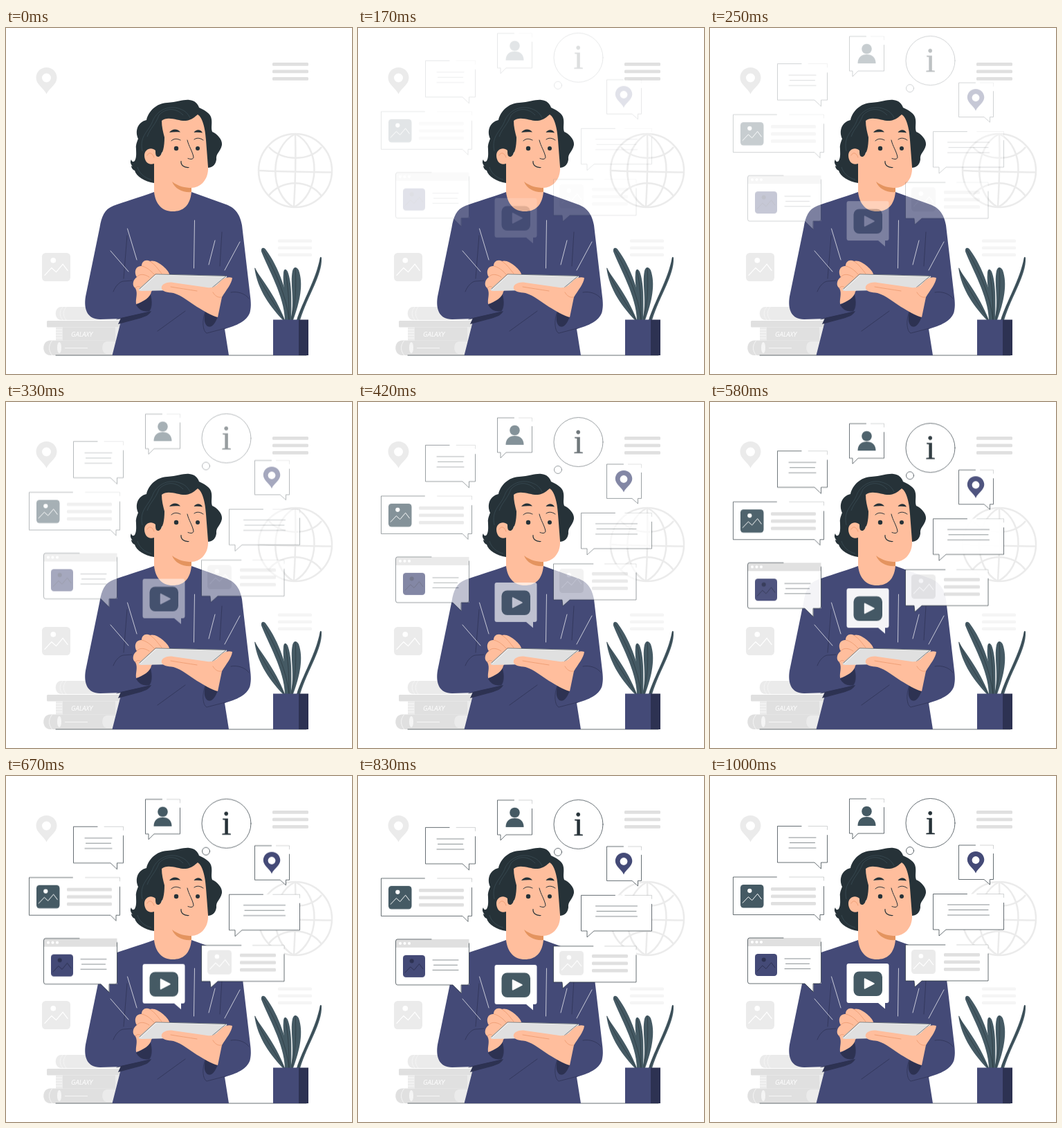
Write an HTML page that moves like this. It is 500 px wide and 500 px high and loops after 1.04 s.

```html
<!DOCTYPE html>
<html lang="en">
<head>
<meta charset="utf-8">
<title>Reading on a tablet</title>
<style>
  html, body { margin: 0; width: 100%; height: 100%; overflow: hidden; background: #fff; }
  svg { display: block; width: 100vw; height: 100vh; }
  .line { fill: none; stroke: #263238; stroke-width: .7; stroke-linecap: round; stroke-linejoin: round; }
  .thin { stroke-width: .55; }
  .globe { fill: none; stroke: #ebebeb; stroke-width: 2.5; }
  .ink { fill: #263238; }
  .slate { fill: #455a64; }
  .navy { fill: #444a77; }
  .deep { fill: #2d3252; }
  .skin { fill: #ffbe9d; }
  .shine { fill: none; stroke: #fff; stroke-width: .7; stroke-linecap: round; }
  .fold { fill: none; stroke: #2d3252; stroke-width: .7; stroke-linecap: round; }
  .crease { fill: none; stroke: #eb996e; stroke-width: .8; stroke-linecap: round; }
  .vein { fill: none; stroke: #263238; stroke-width: .6; }
  .pale { fill: #ebebeb; }
  .grey { fill: #e0e0e0; }
</style>
</head>
<body>
<svg viewBox="0 0 500 500">
  <g id="back">
    <path class="pale" fill-rule="evenodd" d="M58.500 57C50 57 43.500 63.500 43.500 72C43.500 82 55 87 58.500 95.500C62 87 73.500 82 73.500 72C73.500 63.500 67 57 58.500 57ZM58.500 65.500a6.500 6.500 0 1 1 0 13a6.500 6.500 0 1 1 0-13Z"/>
    <g class="globe">
      <ellipse cx="418" cy="206" rx="53" ry="53"/>
      <path d="M418 153C419 185 418 225 416 259M365 206C400 208 440 208 471 208.500"/>
      <path d="M418 153C380 172 380 240 416 259M418 153C456 172 454 240 416 259"/>
      <path d="M380 172C398 193 440 193 456 172M379 243C398 218 438 218 456 243"/>
    </g>
  </g>

  <g id="books">
    <path class="pale" d="M80 403H165V422H80C69 422 69 403 80 403Z"/>
    <path d="M82 403C77 409 77 416 82 422M87 403C82 409 82 416 87 422" fill="none" stroke="#f5f5f5"/>
    <rect class="grey" x="59" y="423" width="110" height="9.500" rx="1.500"/>
    <rect class="pale" x="72" y="432.500" width="95" height="19"/>
    <path d="M72 436h9M72 440h9M72 444h9M72 448h9" fill="none" stroke="#fafafa" stroke-width="1.200"/>
    <rect class="grey" x="82" y="432.500" width="76" height="19"/>
    <text x="94" y="446" font-family="Open Sans, Inter, sans-serif" font-size="9.500" font-style="italic" fill="#fff">GALAXY</text>
    <path class="grey" d="M64 451.500H160V473H64C51 473 51 451.500 64 451.500Z"/>
    <path d="M67 451.500C61 458 61 467 67 473M85 462.500h33" fill="none" stroke="#f5f5f5"/>
    <ellipse cx="77" cy="462" rx="3" ry="8" fill="#f5f5f5"/>
    <path class="pale" d="M146 453H160V471H146C137 471 137 453 146 453Z"/>
  </g>

  <path class="line" d="M72 473H434"/>

  <g id="plant">
    <g class="slate">
      <path d="M400 422C384 405 363 379 359 346C368 362 388 384 403 422Z"/>
      <path d="M403 422C402 387 379 349 369 323C368 317 373 316 376 321C394 345 408 385 412 422Z"/>
      <path d="M406 422C406 395 399 372 401 353C402 347 405 348 407 352C413 367 413 395 412 422Z"/>
      <path d="M411 422C418 395 410 370 414 351C416 344 420 345 423 350C430 370 425 395 415 422Z"/>
      <path d="M420 422C428 396 448 363 453.500 333C454 330 456 330 456 333C457 357 437 385 425 422Z"/>
    </g>
    <path class="vein" d="M360 347C370 375 388 398 402 422M371 320C388 350 405 385 409 422M403 350C408 370 409 395 409 422M418 347C420 375 418 398 413 422M455 332C452 362 431 392 422 422"/>
    <rect class="navy" x="386" y="421.500" width="38" height="51.500"/>
    <rect class="deep" x="423" y="421.500" width="14" height="51.500"/>
  </g>

  <g id="person">
    <path class="navy" d="M214 237C192 245 171 251 155 257C142 262 138 273 135.500 288L115 388C112 407 118 421 136 421L167 420L153.500 473H322L316 435C333 430 348 424 352.500 411C355 401 353.500 393 352.500 384L341 285C338 267 329 259 318 255L268 237Z"/>
    <path class="ink" d="M214 224C200 222 188 214 186 206C183 205 181 202 181 199L183 200C180 197 179 193 181 190C182 194 184 194 186 192C189 187 188 180 188 175C187 170 189 165 191 160C186 149 190 136 203 133C206 120 217 109 233 108C248 107 257 103 265 104C273 105 277 109 279 115C287 119 296 123 297 132C298 139 296 144 298 150C305 153 313 161 312 169C310 179 303 181 304 190C303 198 298 202 291 202L275 150L225 180Z"/>
    <path class="skin" d="M225 134C234 126 250 135 260 134C269 133 273 128 277 125C284 129 288 145 289 162L292 201C293 220 280 231 268 231L268 237C266 257 256 265 241 265C226 265 216 255 214 237V196C206 199 200 193 200 184C200 175 210 171 216 177C216 185 217 186 221 186C227 182 229 171 229 158C227 150 225 143 225 134Z"/>
    <path d="M240 222C249 229 259 231 268 231V237C256 238 244 233 240 222Z" fill="#e4945f"/>
    <path d="M197 178C192 155 207 150 213 132C220 118 237 110 254 118C261 121 264 126 266 130M204 157C208 145 216 140 221 126C232 114 247 116 256 126M190 201C192 209 200 217 210 219" fill="none" stroke="#455a64" stroke-width=".5"/>
    <path class="crease" d="M204 184C207 178 212 181 214 187"/>
    <path class="ink" d="M236 151C240 145 248 145 252 150.500C247 150 241 150 236 151ZM271.500 151C275 146 281 146 284 151.500C280 150.500 276 150.500 271.500 151Z"/>
    <circle class="ink" cx="246" cy="174" r="3.200"/>
    <circle class="ink" cx="277" cy="174" r="3"/>
    <g class="line">
      <path stroke-width="1" d="M239 163C243 159 248 160 252 162M272 161C276 158 281 159 285 162M262 162C264 171 270 179 271 187C270 190 267 190 263 188.500"/>
      <path stroke-width="1.200" d="M253 192.500C252.500 198 257 202 264 201.500"/>
    </g>

    <path class="deep" d="M188 400C198 396 206 387 208 382C210 390 212 403 207 409C198 411 192 407 188 400ZM166 419L210 409C207 415 202 417 192 420L162 428ZM288 410L306 417C302 428 297 434 291 431C286 427 286 419 288 410Z"/>
    <path class="fold" d="M208 384C212 395 211 407 205 411L160 421M288 410C283 422 284 438 290 441L317 434M175 300L170 362M155 381C158 373 164 367 169 366L182 365M219 438L259 409M312 295L309 344M325 382C335 380 346 384 351 391"/>
    <path class="shine" d="M151 322L177 352M175.500 290L189 335M272.500 278L271.500 347M302 307L293 342M338 309L316 350"/>

    <path class="skin" d="M188 399C187 390 191 384 187 376C181 372 184 363 189 360C184 352 188 343 196 344C196 337 202 334 208 337C217 333 236 350 236 356L222 365L210 381C209 389 198 396 188 399Z"/>
    <path class="crease" d="M189 360C192 355 200 355 207 360M196 344C202 345 209 350 214 356M208 337C215 341 220 349 225 355M187 376C190 372 193 373 195 376"/>
    <path class="grey" d="M192 377L215 357Q216 355.500 219 355.500L317 358Q321 358.500 318 361L301 376Q299 378 295 378L195 380Q191 380 192 377Z"/>
    <path d="M194 378L217 356.800L318 359.300" fill="none" stroke="#f5f5f5" stroke-width=".9"/>
    <path class="line thin" d="M193 377L216 355.800L318 358.500L297 376"/>
    <path class="skin" d="M225 377C223 371 232 366 242 368L291 375C299 376 304 373 309 367C314 361 321 359 327 361C326 370 318 379 312 389L306 418C297 416 285 408 276 403C265 396 255 387 242 383C233 382 227 381 225 377Z"/>
    <path class="crease" d="M238 374C250 376 263 378 276 380M311 389C306 390 302 387 299 382"/>
  </g>

  <g id="bubbles"></g>
</svg>

<script>
const bubbles = document.getElementById('bubbles');
const back = document.getElementById('back');
const add = (parent, markup) => parent.insertAdjacentHTML('beforeend', markup);

const bars = (x, y, w, step, fill, h = 4.8) => [0, 1, 2].map(i =>
  `<rect x="${x}" y="${y + i * step}" width="${w}" height="${h}" rx="1.5" fill="${fill}"/>`).join('');

const rules = (x, y, w, step) => [0, 1, 2].map(i =>
  `<path class="line thin" d="M${x + i % 2 * 1.5} ${y + i * step}h${w - i % 2 * 3}"/>`).join('');

const picture = (x, y, size, fill, ink = '#fff') => `<g transform="translate(${x} ${y}) scale(${size / 34})">
  <rect width="34" height="34" rx="4.500" fill="${fill}"/>
  <circle cx="13.500" cy="9" r="3.200" fill="${ink}"/>
  <path d="M3 27L11.500 18L17 23L25 13.500L31 21.500" fill="none" stroke="${ink}" stroke-width="1"/></g>`;

// Speech box; the tail runs from x1 over its tip to x2 on the lower edge.
function box(x, y, w, h, [x1, tip, x2, drop], content) {
  const r = x + w, b = y + h;
  const tail = `L${x2} ${b}L${tip} ${b + drop}L${x1} ${b}`;
  return `<path d="M${x} ${y}H${r}V${b}${tail}H${x}Z" fill="#fff"/>
    <path class="line" d="M${x + w * .48} ${y}H${x}V${b}H${x1}L${tip} ${b + drop}L${x2} ${b}H${r}V${y + h * .25}"/>
    <path class="line" opacity=".3" d="M${x + w * .62} ${y}H${r}V${y + 5}"/>${content}`;
}

add(back, bars(385, 50, 52, 10.5, '#e0e0e0') + bars(393, 305.5, 49, 10, '#f5f5f5', 4.5) + picture(52, 325, 41, '#ebebeb'));

add(bubbles,
  box(201.5, 33, 50, 50, [206, 206, 214, 8], `
    <circle class="slate" cx="226.500" cy="51" r="7.300"/>
    <path class="slate" d="M213.500 72C213.500 63 219 59 226.500 59S239.500 63 239.500 72Z"/>`) +
  `<circle cx="318.500" cy="68" r="35.500" fill="#fff"/><circle class="line" cx="318.500" cy="68" r="35.500"/>
   <circle cx="289" cy="108" r="5.500" fill="#fff"/><circle class="line" cx="289" cy="108" r="5.500"/>
   <text class="ink" x="318.500" y="83.500" text-anchor="middle" font-family="Liberation Serif, Times, serif" font-size="51" stroke="#263238" stroke-width=".4">i</text>` +
  box(97.5, 72.5, 72, 52.5, [151, 160.5, 160.5, 9], rules(114, 89, 39, 7.5)) +
  box(33.5, 146, 131, 54.5, [151, 159, 159, 8], picture(44, 157, 33.5, '#455a64') + bars(88, 161, 65, 10.5, '#e0e0e0')) +
  box(359.5, 100, 50, 49.5, [396, 404.5, 404.5, 7.5], `
    <path class="navy" d="M384 109C377 109 371.800 114.500 371.800 121C371.800 129 381 133 384 140.500C387 133 396.300 129 396.300 121C396.300 114.500 391 109 384 109Z"/>
    <circle cx="384" cy="121.500" r="5.400" fill="#fff"/>`) +
  box(322.5, 170.5, 102, 51.5, [331, 331, 341, 9], rules(343.5, 186, 60, 7.5)) +
  `<path d="M57 234H160.500V300H149.500V312L137 300H54.500V237Q54.500 234 57 234Z" fill="#fff"/>
   <path class="grey" d="M57 234H160.500V246H54.500V237Q54.500 234 57 234Z"/>
   <path class="line" d="M106 234H57Q54.500 234 54.500 237V297Q54.500 300 57 300H137L149 312V300H158Q160.500 300 160.500 297V240"/>` +
  [61, 67.5, 74].map(x => `<circle cx="${x}" cy="240" r="2.100" fill="#fff"/>`).join('') +
  picture(65, 257, 32, '#444a77', '#2d3252') + rules(108, 264, 37, 7.3) +
  `<path d="M200.500 271H255.500Q258.500 271 258.500 274V325Q258.500 328 255.500 328H253V336.500L243 328H200.500Q197.500 328 197.500 325V274Q197.500 271 200.500 271Z" fill="#fff"/>
   <rect class="slate" x="207.500" y="282.500" width="41.500" height="35.500" rx="8"/>
   <path d="M223.500 293V307L237 300Z" fill="#fff" stroke="#fff" stroke-width="1.500" stroke-linejoin="round"/>` +
  box(282.5, 244, 119.5, 52, [295, 296, 306, 9], picture(291, 251, 35, '#ebebeb') + bars(338, 256, 52, 10.5, '#e0e0e0'))
);

const LOOP = 1040, FPS = 24;
const drop = bubbles.animate([
  { opacity: 0, transform: 'translateY(-30px)' },
  { opacity: 1, transform: 'translateY(0px)' }
], { duration: 1000, fill: 'both', easing: 'cubic-bezier(.36, -.01, .5, 1.38)' });
drop.pause();

const start = performance.now();
function draw() {
  const ms = (performance.now() - start) % LOOP;
  const step = Math.floor((Math.floor(ms / 10) * 10 + 5) * FPS / 1000);
  drop.currentTime = Math.min(1000, (step + 1) * 1000 / FPS);
  bubbles.style.visibility = step < 2 ? 'hidden' : 'visible';
  requestAnimationFrame(draw);
}
draw();
</script>
</body>
</html>
```
